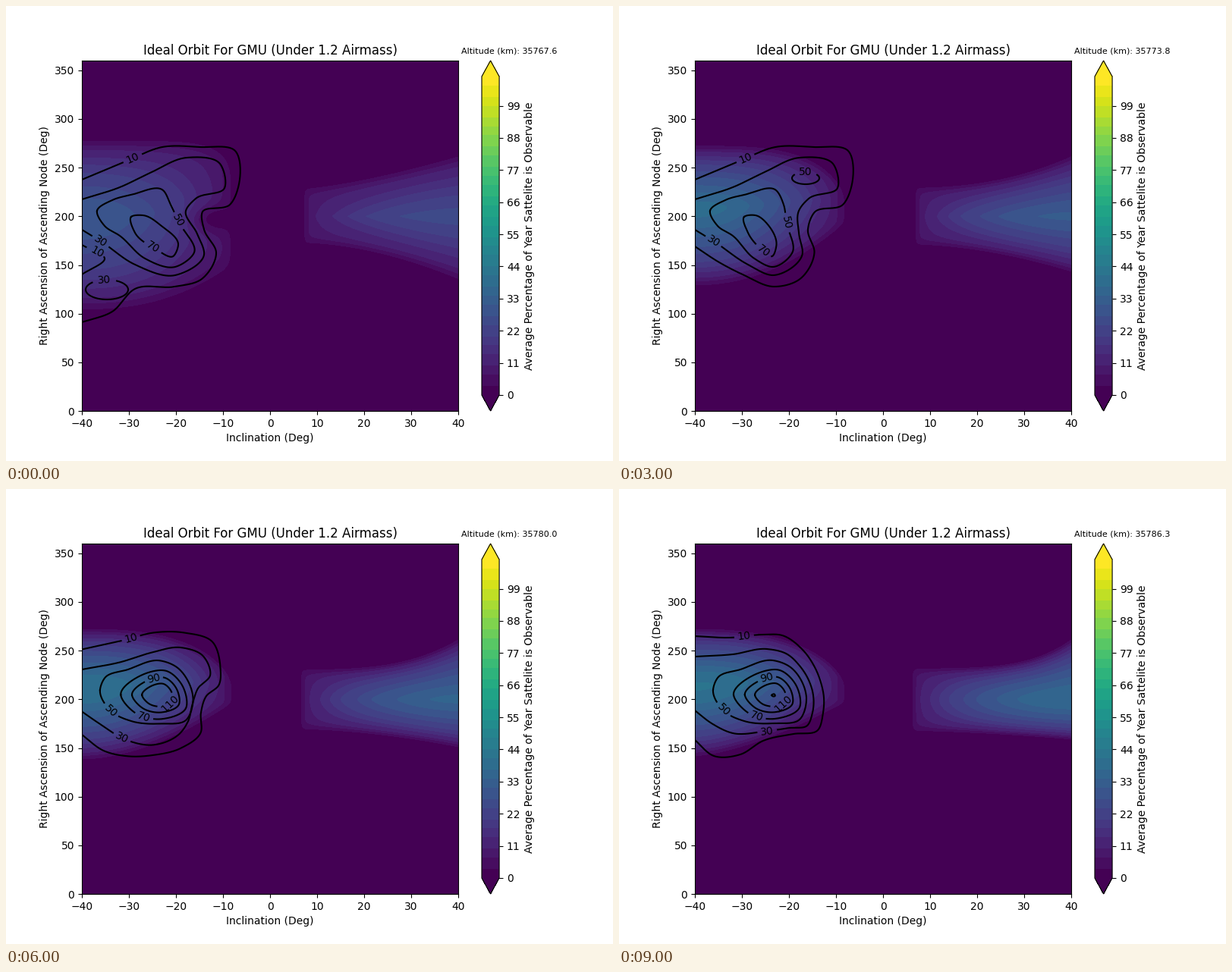
Write a matplotlib script that moves like this. It is 800 by 600 pixels and loops after 10000 ms.

```python
import numpy as np
import matplotlib.pyplot as plt
from matplotlib.animation import FuncAnimation

plt.rcParams["font.family"] = "DejaVu Sans"

STEPS = 10
SAMPLES = 500
BASE = 7          # height of the steep-sided plateau under each lobe
EDGE = 100        # left side of the plot, in pixels
XS = np.linspace(-40, 40, 281)
Y = np.linspace(0, 360, 361)[:, None]


def ease(u):
    u = np.clip(u, 0, 1)
    return u * u * (3 - 2 * u)


# ---------------------------------------------------------------- fill field
def lobe(lo, hi, ridge, peak, power):
    up = (Y - ridge) / np.maximum(hi - ridge, 2)
    down = (ridge - Y) / np.maximum(ridge - lo, 2)
    u = np.clip(np.where(Y > ridge, up, down) / 1.03, 0, 1)
    return (np.minimum(peak, BASE) * (1 - u ** 8)
            + np.maximum(peak - BASE, 0) * (1 - u ** power))


def left_lobe(t):
    fade = np.exp(-t)
    s = np.clip((XS + 40) / 32.5, 0, 1)
    tip_hi, tip_lo = 200 + 30 * fade, 198 - 48 * fade
    bend = 1.6 + 6.4 / (1 + 0.8 * t)
    hi = tip_hi + (272 + 6 * fade - tip_hi) * np.sqrt(1 - s ** bend)
    start = 104 + 40 * (1 - np.exp(-t / 3))
    lo = start + (tip_lo - start) * s ** (2.4 - 0.1 * t)
    top = 30 + 12 * (1 - np.exp(-t / 2.5))
    peak = BASE * (1 - s ** 16) + (top - BASE) * (1 - s ** 2.2) ** 1.4
    z = lobe(lo, hi, lo + 0.55 * (hi - lo), peak, 1.4)
    notch = np.clip(1 - 0.45 * t, 0, 1)
    return z * (1 - notch * np.exp(-((XS + 11) / 5) ** 2
                                   - ((Y - 197) / 14) ** 2))


def right_lobe(t):
    w = t / (STEPS - 1)
    x0 = 7 - w
    s = np.clip((XS - x0) / (40 - x0), 0, 1)
    hi = 229 + 3 * w + (33 - 4 * w) * s ** (1.4 + 2.6 * w)
    lo = 172 - 5 * w - (37 - 29 * w) * s ** 1.8
    peak = (BASE * (1 - np.exp(-40 * s))
            + (19.5 + 10.5 * w ** 0.6) * (1 - (1 - s) ** 2.1))
    return lobe(lo, hi, 200, peak, 1 + 0.6 * w)


# ------------------------------------------------------------- contour lines
def pts(*xy):
    return np.reshape(xy, (-1, 2)).astype(float)


# Key points of each ring in the early and the late pose, in stage pixels;
# a ring that starts at the left edge of the plot is open.
OUTER = (pts(100, 229, 160, 204, 206, 186, 255, 186, 302, 191, 307, 235,
             295, 262, 258, 272, 253, 295, 264, 325, 245, 360, 210, 370,
             165, 355, 132, 338, 100, 317),
         pts(100, 194, 145, 196, 190, 192, 215, 193, 242, 212, 258, 235,
             266, 255, 270, 275, 269, 295, 262, 318, 230, 323, 190, 332,
             160, 350, 125, 352, 100, 331))
SECOND = (pts(100, 255, 150, 239, 190, 220, 238, 200, 282, 208, 288, 240,
              250, 254, 237, 270, 242, 300, 248, 328, 210, 355, 170, 341,
              126, 311, 100, 295),
          pts(100, 221, 150, 218, 195, 211, 222, 218, 238, 233, 250, 252,
              256, 272, 255, 295, 248, 312, 225, 315, 190, 320, 150, 322,
              122, 309, 100, 292))
THIRD = (pts(120, 270, 140, 256, 165, 249, 207, 243, 217, 262, 223, 285,
             235, 325, 210, 344, 180, 333, 150, 303, 130, 290),
         pts(124, 265, 130, 249, 160, 238, 203, 226, 226, 235, 240, 252,
             247, 278, 238, 304, 205, 309, 165, 306, 140, 294))
INNER = (pts(165, 278, 180, 276, 200, 290, 214, 315, 208, 330, 190, 320,
             170, 299),
         pts(151, 271, 183, 243, 212, 239, 234, 260, 238, 288, 205, 303,
             170, 295))
CENTRE = np.array((204, 272))


def smooth(p):
    """Cubic Hermite curve through p, sampled evenly along its length."""
    n, first, last = len(p), 0, len(p) - 1
    if p[0, 0] != EDGE:
        p = np.vstack([p[-3:], p, p[:3]])
        first, last = 3, 3 + n
    s = np.r_[0, np.cumsum(np.hypot(*np.diff(p, axis=0).T))]
    m = np.gradient(p, s, axis=0)
    q = np.linspace(s[first], s[last], SAMPLES)
    i = np.clip(np.searchsorted(s, q, side="right") - 1, 0, len(s) - 2)
    h = (s[i + 1] - s[i])[:, None]
    u = (q - s[i])[:, None] / h
    return ((1 + 2 * u) * (1 - u) ** 2 * p[i] + u * (1 - u) ** 2 * h * m[i]
            + u * u * (3 - 2 * u) * p[i + 1] + u * u * (u - 1) * h * m[i + 1])


def ellipse(x, y, rx, ry):
    a = np.linspace(0, 2 * np.pi, SAMPLES)
    return np.column_stack([x + rx * np.cos(a), y + ry * np.sin(a)])


def pose(ring, t, w):
    """Blend of both poses; the early one's lower right drifts left."""
    early, late = ring
    x, y = early.T
    pull = np.clip((x - 170) / 40, 0, 1) * np.clip((y - 270) / 40, 0, 1)
    shift = 6.5 * (2 - min(t, 4)) * pull
    return (1 - w) * (early + np.column_stack([shift, 0 * shift])) + w * late


def outlines(t):
    """Yield (text, label place, curve) for one step."""
    slow, fast = ease((t - 3.5) / 5), ease((t - 3.8) / 2.4)

    outer = pose(OUTER, t, slow)
    tail = np.clip(2 - t, 0, 1)
    outer[-3:] += tail * pts(5, 18, 8, 65, 0, 100)
    yield "10", (165, 198), smooth(outer)
    if tail:
        yield "10", (120, 324), smooth(pts(100, 315, 130, 333, 100, 354))

    yield "30", (125 + 70 * slow, 310 + 8 * slow), smooth(pose(SECOND, t, slow))
    if t < 1:
        yield "30", (129, 362), ellipse(133, 374, 28, 13)

    yield "50", (223 - 84 * fast, 285 + 5 * fast), smooth(pose(THIRD, t, fast))
    if 2 <= t < 5:
        yield "50", (246, 219), ellipse(246, 227, 24 - 2 * t, 11 - t)

    inner = pose(INNER, t, fast)
    yield "70", (191 - 9 * fast, 322 - 24 * fast), smooth(inner)
    if t >= 6:
        yield "90", (195, 250), smooth(CENTRE + 0.72 * (inner - CENTRE))
        yield "110", (217, 284), smooth(CENTRE + 0.47 * (inner - CENTRE))
    if t >= 7:
        size = 0.14 - 0.045 * (t - 7)
        yield "130", None, smooth(CENTRE + size * (inner - CENTRE))


def to_data(p):
    return (p[..., 0] - EDGE) / 6.2 - 40, (534 - p[..., 1]) * 360 / 462


# -------------------------------------------------------------------- figure
fig, ax = plt.subplots(figsize=(8, 6), dpi=100)
cmap = plt.get_cmap("viridis", 32)
levels = np.arange(110)
live = []


def draw_fill(t):
    z = np.where(XS < 0, left_lobe(t), right_lobe(t))
    fill = ax.contourf(XS, Y[:, 0], z, levels=levels, cmap=cmap, extend="both")
    live.append(fill)
    return fill


def draw_line(text, label, c):
    """Draw a curve, broken around its label."""
    if label is not None:
        closed = np.hypot(*(c[0] - c[-1])) < 1
        step = np.hypot(*np.diff(c, axis=0).T).mean()
        i = int(np.argmin(np.hypot(*(c - label).T)))
        gap = int((4.4 * len(text) + 4.5) / step)
        k = np.arange(i - gap, i + gap + 1)
        k = k % SAMPLES if closed else np.clip(k, 0, SAMPLES - 1)
        dx, dy = c[k[-1]] - c[k[0]]
        angle = (np.degrees(np.arctan2(-dy, dx)) + 90) % 180 - 90
        x, y = to_data(c[i])
        live.append(ax.text(x, y, text, rotation=angle, fontsize=10,
                            ha="center", va="center"))
        c[k] = np.nan
    live.extend(ax.plot(*to_data(c), color="black", lw=1.5))


bar = fig.colorbar(draw_fill(0), ax=ax, ticks=range(0, 100, 11))
bar.minorticks_off()
bar.set_label("Average Percentage of Year Sattelite is Observable")
ax.set_facecolor(cmap(0))
ax.set_title("Ideal Orbit For GMU (Under 1.2 Airmass)")
ax.set_xlabel("Inclination (Deg)")
ax.set_ylabel("Right Ascension of Ascending Node (Deg)")
ax.set_xlim(-40, 40)
ax.set_ylim(0, 360)
ax.autoscale(False)
altitude = fig.text(600 / 800, 1 - 63 / 600, "", fontsize=8)


def update(t):
    while live:
        live.pop().remove()
    draw_fill(t)
    for outline in outlines(t):
        draw_line(*outline)
    altitude.set_text(f"Altitude (km): {35767.58 + 2.078 * t:.1f}")


anim = FuncAnimation(fig, update, frames=STEPS, interval=1000, repeat=True,
                     repeat_delay=0, init_func=lambda: None)
plt.show()
```
